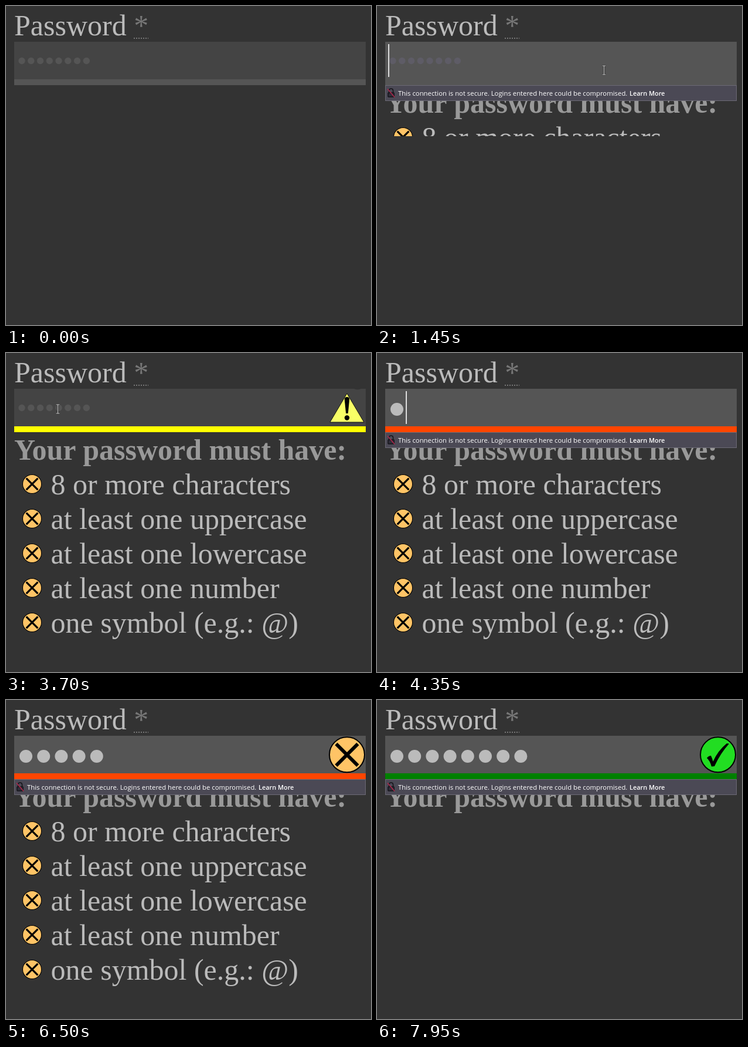
These frames come from a looping animation (623 px wide and 544 px high, 8 s). An HTML page:

```html
<!DOCTYPE html>
<html lang="en">
<head>
<meta charset="utf-8">
<title>Password field</title>
<style>
  html, body { margin: 0; width: 100%; height: 100%; overflow: hidden; background: #333; }
  svg { display: block; }
  .serif { font: 50px "Liberation Serif", serif; fill: #bbb; }
  .bold { font-weight: bold; fill: #999; }
  .note { font: 11.33px "Open Sans", sans-serif; fill: #fff; }
  .more { font-size: 10.9px; font-weight: 600; }
</style>
</head>
<body>
<svg id="stage" width="623" height="544" viewBox="0 0 623 544">
  <defs>
    <clipPath id="fold"><rect id="foldBox" x="0" y="135" width="623" height="0"/></clipPath>
    <g id="cross">
      <circle r="30" fill="#ffc466" stroke="#000" stroke-width="2"/>
      <path d="M-18.5-18.5L18.5 18.5M18.5-18.5L-18.5 18.5" stroke="#000" stroke-width="6"/>
    </g>
  </defs>
  <rect width="623" height="544" fill="#333"/>
  <text class="serif" x="14" y="50">Password</text>
  <text class="serif" x="218.2" y="50" style="fill:#777">*</text>
  <path d="M218 55H243" stroke="#777" stroke-width="2" stroke-dasharray="2 2"/>

  <rect id="field" x="14" y="61" width="600" height="64"/>
  <rect id="bar" x="14" y="125" width="600" height="10"/>
  <g id="hint"></g>
  <g id="typed" fill="#bbb"></g>

  <g id="warn">
    <path d="M594 61Q600 63.5 606 61Z" fill="#333"/>
    <path d="M582 69L611 118H553Z" fill="#f8ff66" stroke="#111" stroke-width="1"/>
    <path d="M577.8 79Q577.8 75 582 75Q586.2 75 586.2 79L583.8 103H580.2Z"/>
    <circle cx="582" cy="110.5" r="4.2"/>
  </g>
  <use id="bad" href="#cross" x="582" y="93.3"/>
  <g id="good">
    <circle cx="582" cy="93.3" r="30" fill="#22dd22" stroke="#000" stroke-width="2"/>
    <path d="M563 99Q566 95 570 95Q572 99 573.5 105Q582 86 597 74L601 74.5Q586 91 576 113L571 113.5Q568 103 563 99Z"/>
  </g>
  <rect id="caret" y="65" width="2" height="56" fill="#ddd"/>

  <g id="list" clip-path="url(#fold)">
    <text class="serif bold" x="14" y="182">Your password must have:</text>
  </g>

  <g id="notice">
    <rect x="14.5" y="135.5" width="599" height="26" fill="#4b4955" stroke="#6c6a75"/>
    <path d="M20.5 148V144.5Q20.5 141 24 141Q27.5 141 27.5 144.5V148" fill="none" stroke="#15141a" stroke-width="1.6"/>
    <rect x="18.8" y="148" width="10.4" height="7" rx="1" fill="#2f2d38" stroke="#15141a" stroke-width="1.4"/>
    <path d="M18 141.5L30 155.5" stroke="#b0264a" stroke-width="1.6"/>
    <text class="note" x="36" y="153">This connection is not secure. Logins entered here could be compromised.</text>
    <text class="note more" x="431" y="153">Learn More</text>
  </g>

  <g id="beam" fill="none">
    <path d="M-3.5-7.5H3.5M0-7.5V7.5M-3.5 7.5H3.5" stroke="#333" stroke-width="2.6"/>
    <path d="M-3-7.5H3M0-7.5V7.5M-3 7.5H3" stroke="#ccc"/>
  </g>
  <path id="arrow" d="M.5.5V16.5L4.2 13L6.7 18.5L9.2 17.4L6.8 12H11.8Z" fill="#fff" stroke="#000"/>
</svg>
<script>
const LOOP = 8000;
const $ = id => document.getElementById(id);
const between = (t, a, b) => t >= a && t < b;
const clamp = v => Math.min(1, Math.max(0, v));
const mix = (a, b, p) => a + (b - a) * p;
const show = (id, on) => $(id).setAttribute('visibility', on ? 'visible' : 'hidden');
const set = (el, attrs) => { for (const k in attrs) el.setAttribute(k, attrs[k]); };

function add(parent, tag, attrs, text) {
  const el = document.createElementNS('http://www.w3.org/2000/svg', tag);
  set(el, attrs);
  if (text) el.textContent = text;
  parent.append(el);
  return el;
}

// cubic-bezier(.42, 0, .58, 1)
function easeInOut(x) {
  let lo = 0, hi = 1;
  for (let i = 0; i < 20; i++) {
    const s = (lo + hi) / 2;
    if (1.26 * s * (1 - s) ** 2 + 1.74 * s * s * (1 - s) + s ** 3 < x) lo = s; else hi = s;
  }
  return lo * lo * (3 - 2 * lo);
}
const ramp = (t, start, span) => easeInOut(clamp((t - start) / span));

const rules = ['8 or more characters', 'at least one uppercase', 'at least one lowercase',
  'at least one number', 'one symbol (e.g.: @)'];
rules.forEach((rule, i) => {
  add($('list'), 'use', { href: '#cross', transform: `translate(44.5 ${223.5 + 59 * i}) scale(.535)` });
  add($('list'), 'text', { class: 'serif', x: 76.5, y: 241 + 59 * i }, rule);
});

const dots = [];
for (let i = 0; i < 8; i++) {
  add($('hint'), 'circle', { cx: 27 + 15.76 * i, cy: 93.5, r: 5.7 });
  dots.push(add($('typed'), 'circle', { cx: 34 + 30.2 * i, cy: 96, r: 11 }));
}

const keys = [4350, 4700, 5150, 5900, 6200, 6550, 6850, 7350];
const caretOn = [[1300, 1900], [2400, 2800], [3850, 4450], [4700, 4950], [5150, 5450],
  [5900, 6000], [6200, 6500], [6550, 7050], [7350, 7550]];

// start, end, from, to; the pointer rests until the given hide time
const moves = [
  { a: 100, b: 900, from: [616, 424], to: [387, 109], hide: 2100 },
  { a: 2100, b: 2350, from: [387, 109], to: [9, 148], hide: 2400 },
  { a: 3450, b: 3700, from: [27, 129], to: [88, 95], hide: 4350 }
];

function drawPointer(t) {
  const m = moves.find(m => between(t, m.a, m.hide));
  let inField = false;
  if (m) {
    const p = ramp(t, m.a, m.b - m.a);
    const x = Math.round(mix(m.from[0], m.to[0], p));
    const y = Math.round(mix(m.from[1], m.to[1], p));
    inField = between(x, 14, 614) && between(y, 61, 135);
    $('beam').setAttribute('transform', `translate(${x + .5} ${y + .5})`);
    $('arrow').setAttribute('transform', `translate(${x} ${y})`);
  }
  show('beam', m && inField);
  show('arrow', m && !inField);
}

function draw(t) {
  const focus = between(t, 1300, 2800) || t >= 3850;
  const count = keys.filter(k => t >= k).length;

  $('field').setAttribute('fill', focus ? '#555' : '#444');
  $('bar').setAttribute('fill',
    t < 2800 ? '#555' : t < 4350 ? '#ff0' : t < 7350 ? '#ff4500' : '#008000');
  $('hint').setAttribute('fill', focus ? '#5e5c66' : '#555');
  show('hint', count === 0);
  dots.forEach((d, i) => d.setAttribute('visibility', i < count ? 'visible' : 'hidden'));

  $('caret').setAttribute('x', Math.round(19 + 30.2 * count));
  show('caret', caretOn.some(([a, b]) => between(t, a, b)));

  show('warn', between(t, 2800, 4350));
  show('bad', between(t, 4450, 7350));
  show('good', t >= 7550);
  show('notice', between(t, 1400, 2800) || t >= 3950);

  const open = ramp(t, 1300, 450) - ramp(t, 7600, 500);
  $('foldBox').setAttribute('height', Math.round(370 * open));
  drawPointer(t);
}

const begin = performance.now();
function tick() {
  draw((performance.now() - begin) % LOOP);
  requestAnimationFrame(tick);
}
tick();
</script>
</body>
</html>
```
